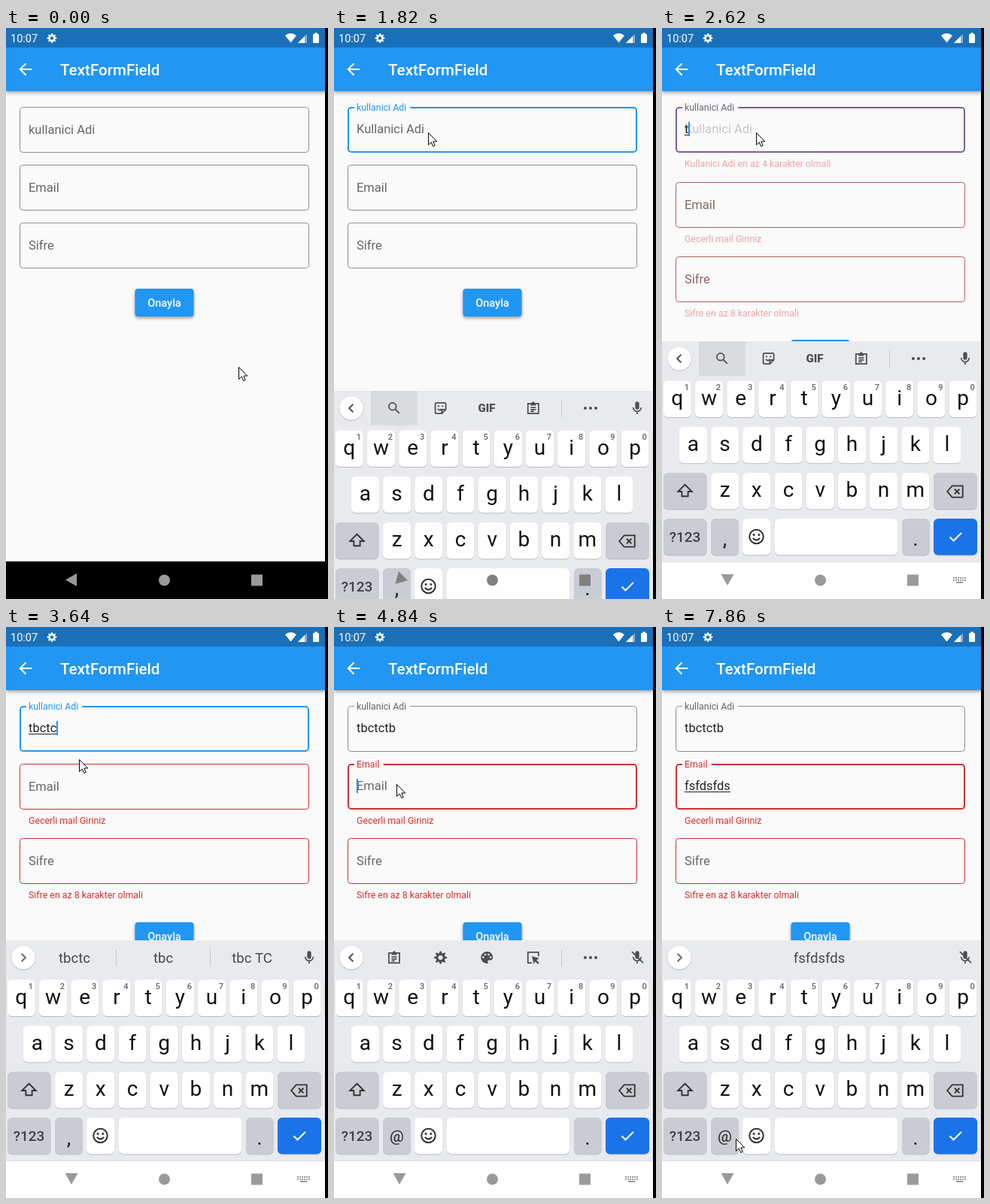
Recreate the animation shown at these times as an HTML page with a canvas. Size 428x760 px, loop 8000 ms.

```html
<!DOCTYPE html>
<html lang="tr">
<head>
<meta charset="utf-8">
<title>TextFormField</title>
<style>
  html, body { margin: 0; width: 100%; height: 100%; overflow: hidden; background: #000; }
  canvas { display: block; }
</style>
</head>
<body>
<canvas id="stage" width="428" height="760"></canvas>
<script>
const ctx = document.getElementById('stage').getContext('2d');
const LOOP = 8000, SCREEN = 424;
const RED = [211, 47, 47], BLUE = [33, 150, 243], GREY = [142, 142, 142], LABEL = [102, 102, 102];
const PAGE = '#fafafa', PRIMARY = '#2196f3', INK = '#4b4f54';

// Each step overrides part of the state from its time on.
const start = {
  mouse: [309, 451], focus: -1, float: [0, 0], user: '', mail: '', hint: 1, caret: false,
  errors: [0, 0, 0], keyboard: null, turn: 0, strip: 'tools', words: [], mailKeys: false
};
const steps = [
  [200, { mouse: [296, 425] }],
  [400, { mouse: [235, 320] }],
  [600, { mouse: [160, 190] }],
  [800, { mouse: [113, 127] }],
  [1000, { mouse: [125, 139] }],
  [1620, { focus: 0, float: [.5, 0], hint: .3 }],
  [1820, { float: [1, 0], hint: 1, keyboard: 66, turn: .5 }],
  [2020, { keyboard: 0, turn: 1, caret: true }],
  [2620, { user: 't', hint: .35, errors: [.5, .5, .5] }],
  [2820, { user: 'tb', hint: 0, errors: [1, 1, 1], strip: 'words', words: ['', 'tb', ''] }],
  [3020, { user: 'tbc', words: ['', 'tbc', ''] }],
  [3220, { user: 'tbct', errors: [0, 1, 1], words: ['tbct', 'tbc', 'tbc T'] }],
  [3440, { user: 'tbctc', words: ['tbctc', 'tbc', 'tbc TC'], mouse: [112, 157] }],
  [3640, { mouse: [97, 176] }],
  [3840, { user: 'tbctct', words: ['', 'tbctct', ''] }],
  [4040, { user: 'tbctctb', words: ['', 'tbctctb', ''] }],
  [4240, { mouse: [90, 195] }],
  [4440, { mouse: [83, 209] }],
  [4640, { focus: 1, float: [1, .5], hint: .3 }],
  [4840, { float: [1, 1], hint: 1, strip: 'settings', mailKeys: true }],
  [5240, { mouse: [75, 222] }],
  [5440, { mouse: [60, 245] }],
  [5640, { mouse: [48, 262] }],
  [5840, { mail: 'f', hint: 0, strip: 'words', words: ['', 'f', ''] }],
  ...['fs', 'fsf', 'fsfd', 'fsfds', 'fsfdsf', 'fsfdsfds'].map((mail, i) =>
    [6240 + 200 * i, { mail, words: ['', mail, ''] }]),
  [7460, { mouse: [70, 420], caret: false }],
  [7660, { mouse: [107, 640] }],
  [7860, { mouse: [98, 681] }]
];

// Icons on a 24 unit grid: stroked outline, filled part.
const circle = (x, y, r) => `M${x - r} ${y}a${r} ${r} 0 1 0 ${2 * r} 0a${r} ${r} 0 1 0 ${-2 * r} 0z`;
const gear = () => {
  let d = '';
  for (let i = 0; i < 32; i++) {
    const r = i % 4 < 2 ? 9.8 : 7, a = (i - .5) * Math.PI / 16;
    d += `${i ? 'L' : 'M'}${12 + r * Math.cos(a)} ${12 + r * Math.sin(a)}`;
  }
  return d + 'z' + circle(12, 12, 3.4);
};
const mic = ['M6 11a6 6 0 0 0 12 0M12 17v4', 'M9 5a3 3 0 0 1 6 0v6a3 3 0 0 1-6 0z'];
const icons = {
  back: ['M20 12H5M12.5 4.5L5 12l7.5 7.5'],
  left: ['M14.5 6.5L9 12l5.5 5.5'],
  right: ['M9.5 6.5L15 12l-5.5 5.5'],
  search: [circle(9.5, 9.5, 5.5) + 'M13.7 13.7l6 6'],
  sticker: ['M4 6a2 2 0 0 1 2-2h12a2 2 0 0 1 2 2v8l-6 6H6a2 2 0 0 1-2-2zM20 14h-4a2 2 0 0 0-2 2v4M8 13q3 4 6 0',
    circle(9, 9, 1.3) + circle(15, 9, 1.3)],
  clipboard: ['M4 5h16v15H4zM8 11h8M8 14h8M8 17h5', 'M8 4h2a2 2 0 0 1 4 0h2v4H8z'],
  gear: ['', gear()],
  palette: ['', 'M12 3a9 9 0 0 0 0 18c2 0 2-1.5 1.5-2.5s0-2.5 1.5-2.5h2a4 4 0 0 0 4-4.5c0-5-4-8.5-9-8.5z' +
    circle(6.5, 11.5, 1.5) + circle(9.5, 7.5, 1.5) + circle(14.5, 7.5, 1.5) + circle(17.5, 11.5, 1.5)],
  resize: ['M20 10V4H4v16h6', 'M10 10l11 3-4 3 4 4-2 2-4-4-2 4z'],
  dots: ['', circle(4, 12, 2.3) + circle(12, 12, 2.3) + circle(20, 12, 2.3)],
  mic,
  micOff: [mic[0] + 'M4 3l17 17', mic[1]],
  shift: ['M12 4l9 9h-5v6H8v-6H3z'],
  erase: ['M8 5h13v14H8l-6-7zM11 9l6 6M17 9l-6 6'],
  check: ['M4.5 12.5l5 5L20 7'],
  smile: [circle(12, 12, 9) + 'M7.5 14q4.5 5 9 0', circle(8.7, 9.5, 1.5) + circle(15.3, 9.5, 1.5)]
};

const mix = (a, b, t) => a.map((v, i) => Math.round(v + (b[i] - v) * t));
const rgb = c => `rgb(${c})`;

function rect(x, y, w, h, color) {
  ctx.fillStyle = color;
  ctx.fillRect(x, y, w, h);
}

function round(x, y, w, h, r, color) {
  ctx.fillStyle = color;
  ctx.beginPath();
  ctx.roundRect(x, y, w, h, r);
  ctx.fill();
}

function disc(x, y, r, color) {
  ctx.fillStyle = color;
  ctx.beginPath();
  ctx.arc(x, y, r, 0, 7);
  ctx.fill();
}

function poly(points, color) {
  ctx.fillStyle = color;
  ctx.beginPath();
  points.forEach(p => ctx.lineTo(...p));
  ctx.closePath();
  ctx.fill();
}

function text(str, x, y, size, color, { weight = 400, align = 'left', alpha = 1 } = {}) {
  ctx.font = `${weight} ${size}px Roboto, sans-serif`;
  ctx.textAlign = align;
  ctx.fillStyle = color;
  ctx.globalAlpha = alpha;
  ctx.fillText(str, x, y);
  ctx.globalAlpha = 1;
  return ctx.measureText(str).width;
}

function icon(name, x, y, color = INK, scale = .88, weight = 2) {
  const [outline, solid] = icons[name];
  ctx.save();
  ctx.translate(x, y);
  ctx.scale(scale, scale);
  ctx.translate(-12, -12);
  ctx.strokeStyle = ctx.fillStyle = color;
  ctx.lineWidth = weight;
  if (outline) ctx.stroke(new Path2D(outline));
  if (solid) ctx.fill(new Path2D(solid), 'evenodd');
  ctx.restore();
}

function shadow(color, blur, y) {
  ctx.shadowColor = color;
  ctx.shadowBlur = blur;
  ctx.shadowOffsetY = y;
}

function header() {
  shadow('rgba(0,0,0,.4)', 5, 2);
  rect(0, 26, SCREEN, 58, PRIMARY);
  shadow('transparent', 0, 0);
  rect(0, 0, SCREEN, 26, '#1a70b8');
  text('10:07', 6, 19, 14.5, '#fff');
  icon('gear', 61, 13.5, '#fff', .66);
  ctx.fillStyle = '#fff';
  ctx.fill(new Path2D('M371 10Q378.500 4 386 10L378.500 19.500z'));
  poly([[388, 20], [400, 20], [400, 8]], 'rgba(255,255,255,.45)');
  poly([[388, 20], [397, 20], [397, 11]], '#fff');
  round(408, 8, 8, 12, 1, '#fff');
  rect(410, 6.5, 4, 2, '#fff');
  icon('back', 26, 55, '#fff', 1.03);
  text('TextFormField', 72, 62.5, 20.6, '#fff', { weight: 500 });
}

function field(y, f) {
  const base = f.focused ? BLUE : GREY;
  const border = mix(base, RED, f.error);
  const w = f.focused ? 2 : 1;
  ctx.strokeStyle = rgb(border);
  ctx.lineWidth = w;
  ctx.beginPath();
  ctx.roundRect(18 + w / 2, y + w / 2, 385 - w, 61 - w, 4);
  ctx.stroke();

  const size = 16.48 - 4.12 * f.float;
  ctx.font = `400 ${size}px Roboto, sans-serif`;
  if (f.float) rect(27, y - 1, (ctx.measureText(f.label).width + 8) * f.float, 4, PAGE);
  let color = f.focused ? border : LABEL;
  if (f.error > 0 && f.error < 1) color = mix(LABEL, border, .4);
  text(f.label, 30, y + 35.5 - 31 * f.float, size, rgb(color));

  if (f.focused && f.float > 0) text(f.hintText, 30, y + 35, 16.48, '#666', { alpha: f.hint });
  const width = text(f.value, 30, y + 35, 16.48, '#212121');
  if (f.value && f.focused) rect(30, y + 37, width, 1, '#212121');
  if (f.focused && f.caret) rect(Math.round(30 + width), y + 20, 2, 19, PRIMARY);
  if (f.error) {
    text(f.message, 30, y + 79.5, 12.36, rgb(RED), { alpha: f.error < 1 ? .42 : 1 });
  }
}

function form(s) {
  const fields = [
    { label: 'kullanici Adi', hintText: 'Kullanici Adi', value: s.user, message: 'Kullanici Adi en az 4 karakter olmali' },
    { label: 'Email', hintText: 'Email', value: s.mail, message: 'Gecerli mail Giriniz' },
    { label: 'Sifre', hintText: 'Sifre', value: '', message: 'Sifre en az 8 karakter olmali' }
  ];
  let y = 105;
  fields.forEach((f, i) => {
    const { hint, caret } = s;
    field(Math.round(y), { ...f, hint, caret, focused: s.focus === i, float: s.float[i] || 0, error: s.errors[i] });
    y += 76.8 + (s.errors[i] ? 22.8 : 0);
  });
  y = Math.round(y + 11.5);
  shadow('rgba(0,0,0,.4)', 4, 2);
  round(171.5, y, 78, 37, 4, PRIMARY);
  shadow('transparent', 0, 0);
  text('Onayla', 210.5, y + 24, 14.5, '#fff', { weight: 500, align: 'center' });
}

function key(x, y, w, color = '#fff') {
  round(x, y + 1, w, 48.5, 6, '#b9bcc1');
  round(x, y, w, 48.5, 6, color);
}

function strip(s) {
  const words = s.strip === 'words';
  const divider = x => rect(x, 429, 1, 23, '#c6c9cd');
  if (s.strip === 'tools') rect(49, 417, 62, 46, '#d9dbdf');
  shadow('rgba(0,0,0,.2)', 2, 1);
  disc(23, 440, 15.5, '#fff');
  shadow('transparent', 0, 0);
  icon(words ? 'right' : 'left', 23, 440, words ? '#76616d' : INK, .95);
  if (words) {
    s.words.forEach((word, i) => text(word, 91 + 118 * i, 447, 18.5, '#45484c', { align: 'center' }));
    if (s.words[0]) [146, 271].forEach(divider);
  } else {
    const names = s.strip === 'tools' ? ['search', 'sticker', '', 'clipboard'] : ['clipboard', 'gear', 'palette', 'resize'];
    names.forEach((name, i) => name
      ? icon(name, 80 + 61.6 * i, 440)
      : text('GIF', 203, 445, 15, INK, { weight: 900, align: 'center' }));
    divider(302);
    icon('dots', 341, 440);
  }
  icon(s.mailKeys ? 'micOff' : 'mic', 403, 440);
}

function keyboard(s) {
  const dim = '#c9ccd2', pitch = 42.2;
  ctx.save();
  ctx.translate(0, s.keyboard);
  rect(0, 417, SCREEN, 343, '#e8eaed');
  strip(s);
  [['qwertyuiop', 20.3], ['asdfghjkl', 41.4], ['zxcvbnm', 83.6]].forEach(([letters, x0], row) => {
    [...letters].forEach((letter, i) => {
      const x = x0 + pitch * i, y = 469.5 + 61.2 * row;
      key(x - 18.5, y, 37);
      text(letter, x, y + 32, 28, '#111', { align: 'center' });
      if (!row) text((i + 1) % 10, x + 12.5, 482, 11, '#5f6368', { weight: 500, align: 'center' });
    });
  });
  key(2, 592, 57.5, dim);
  icon('shift', 30.5, 616, '#333', 1.03, 1.8);
  key(361, 592, 58, dim);
  icon('erase', 390, 617, '#333', 1.08, 1.7);

  key(2, 653, 57.5, dim);
  text('?123', 30.5, 684, 19, '#3c4043', { weight: 500, align: 'center' });
  key(65, 653, 37, dim);
  if (s.mailKeys) text('@', 83.5, 685, 21, '#222', { align: 'center' });
  else text(',', 83.5, 689, 28, '#222', { align: 'center' });
  key(107, 653, 37);
  icon('smile', 125.5, 677, '#333', 1.03);
  key(150, 653, 163);
  key(319, 653, 36.5, dim);
  text('.', 337, 689, 28, '#222', { align: 'center' });
  key(361, 653, 58, '#1a73e8');
  icon('check', 390, 677, '#fff', 1, 2);
  ctx.restore();
}

function navigation(turn) {
  const color = turn === .5 ? '#808080' : '#9a9a9a';
  if (turn === 0) {
    rect(0, 706, SCREEN, 4, '#fff');
    rect(0, 710, SCREEN, 50, '#000');
  } else if (turn === 1) {
    rect(0, 710, SCREEN, 50, '#fff');
    rect(0, 710, SCREEN, 1, '#dfe1e4');
    for (let i = 0; i < 12; i++) rect(387 + i % 6 * 3, 731 + 3 * Math.floor(i / 6), 2, 2, color);
    rect(391, 737, 9, 2, color);
  }
  ctx.save();
  ctx.translate(87, 734.5 - .5 * turn);
  ctx.rotate(-turn * Math.PI / 2);
  poly([[-8, 0], [7, -8.5], [7, 8.5]], color);
  ctx.restore();
  disc(210.5, 735, 7.5, color);
  rect(326, 727.5, 15, 15, color);
}

function pointer([x, y]) {
  ctx.save();
  ctx.translate(x + .5, y + .5);
  const shape = new Path2D('M0 0V16L3.700 12.500 6.200 18 8.700 17 6.300 11.500H11.300z');
  ctx.fillStyle = '#fff';
  ctx.strokeStyle = '#000';
  ctx.lineWidth = 1;
  ctx.fill(shape);
  ctx.stroke(shape);
  ctx.restore();
}

function draw(time) {
  const s = { ...start };
  for (const [at, change] of steps) if (time >= at) Object.assign(s, change);
  rect(0, 0, SCREEN, 760, PAGE);
  header();
  form(s);
  if (s.keyboard !== null) keyboard(s);
  navigation(s.turn);
  rect(SCREEN, 0, 4, 760, '#000');
  pointer(s.mouse);
}

const origin = performance.now();
function tick() {
  draw((performance.now() - origin) % LOOP);
  requestAnimationFrame(tick);
}
tick();
</script>
</body>
</html>
```
